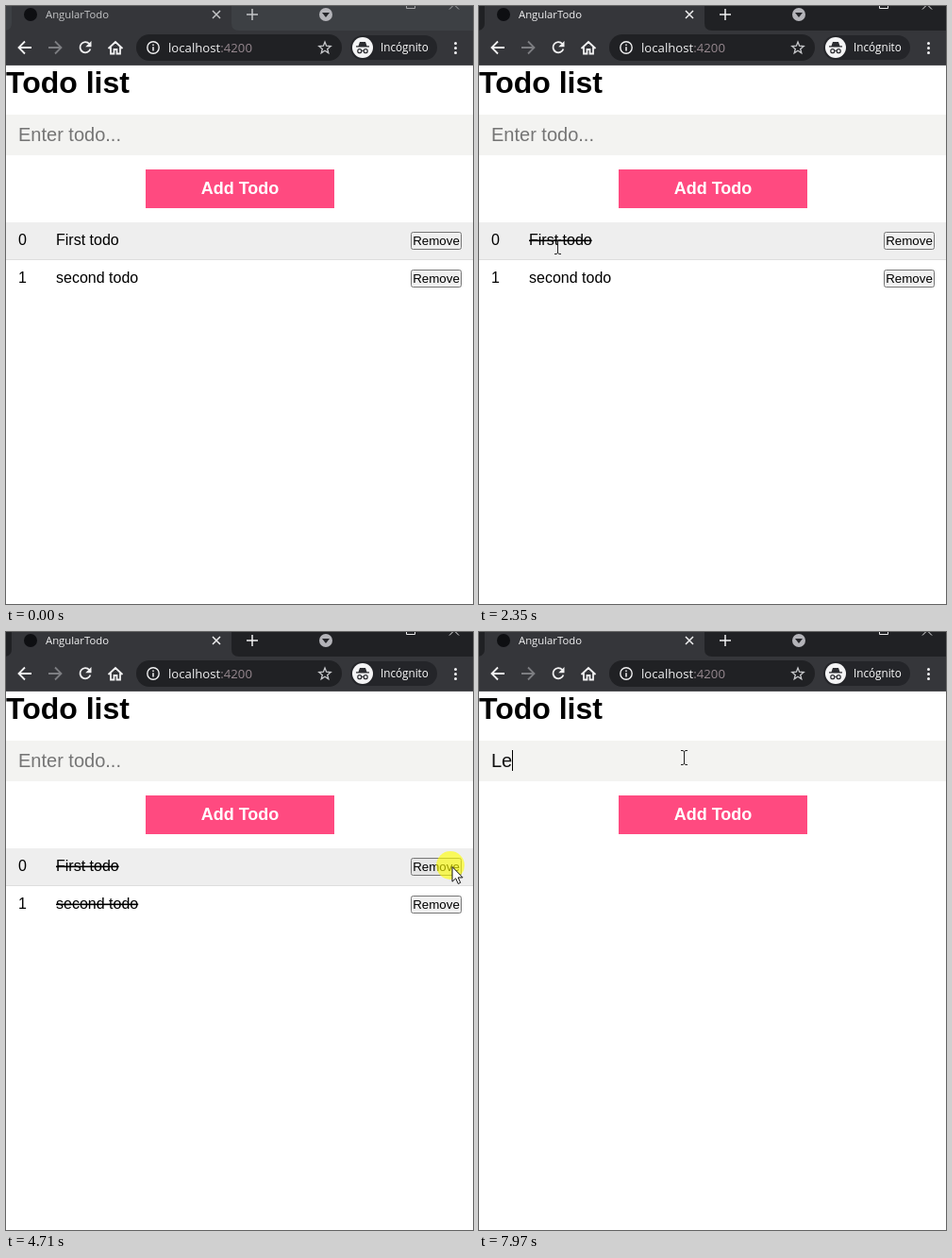
Recreate the animation shown at these times as an HTML page. Size 495x633 px, loop 8 s.

```html
<!DOCTYPE html>
<html lang="en">
<head>
<meta charset="utf-8">
<title>Todo list</title>
<style>
  html, body { margin: 0; width: 100%; height: 100%; overflow: hidden; background: #fff; }
  svg { display: block; width: 100%; height: 100%; }
  text { white-space: pre; }
  .ui { font-family: "Open Sans", "Noto Sans", sans-serif; }
  .page { font-family: "Liberation Sans", Arial, sans-serif; }
  .line { fill: none; stroke: #f1f1f2; stroke-width: 1.8; }
  .done { text-decoration: line-through; }
  #strip, #tabTitle { fill: #3d4044; }
  #tabTitle { fill: #c9cacc; }
  #stage { --ctl: #a5a6a8; --tab: #c4c5c7; --strip: #3d4044; }
  #stage.focused { --ctl: #e9e9ea; --tab: #f1f1f2; --strip: #202124; }
  #stage #strip { fill: var(--strip); }
  #stage #tabTitle { fill: var(--tab); }
  .ctl { fill: none; stroke: var(--ctl); stroke-width: 1; }
  .tabIcon { fill: none; stroke: var(--tab); stroke-width: 1.5; }
</style>
</head>
<body>
<svg id="stage" viewBox="0 0 495 633" xmlns="http://www.w3.org/2000/svg">
  <rect width="495" height="633" fill="#fff"/>

  <!-- tab strip -->
  <g class="ui">
    <rect id="strip" width="495" height="27"/>
    <path d="M-2 26Q6 26 6 18V-2H239V18Q239 26 247 26Z" fill="#35363a"/>
    <rect y="26" width="495" height="36" fill="#35363a"/>
    <rect y="62" width="495" height="1" fill="#4b4c50"/>
    <circle cx="26" cy="9" r="7" fill="#0e0f12"/>
    <text id="tabTitle" x="42" y="13" font-size="11.3">AngularTodo</text>
    <path class="tabIcon" d="M219 5l8 8M227 5l-8 8"/>
    <path class="tabIcon" d="M255 9h12M261 3v12"/>
    <circle cx="339" cy="9" r="7" fill="#b4b4b9"/>
    <path d="M335 7h8l-4 5z" fill="#25262a"/>
    <path class="ctl" d="M424.5 -6V2.5H433.5V-6M470 3.5L475 -1.5L480 3.5"/>
  </g>

  <!-- toolbar -->
  <g class="ui">
    <path class="line" d="M27 44H14M20 37.5L13.5 44L20 50.5"/>
    <path class="line" d="M45 44H58M52 37.5L58.5 44L52 50.5" style="stroke:#7d7e82"/>
    <path class="line" d="M88.3 40A5.6 5.6 0 1 0 89.4 45.5"/>
    <path d="M90.5 37v6.3h-6.3z" fill="#f1f1f2"/>
    <path class="line" d="M108.5 45L116 38L123.500 45M111 43.500V50.500H114.500V46H117.500V50.500H121V43.500" stroke-width="1.6"/>
    <rect x="138" y="30" width="218" height="28" rx="14" fill="#202124"/>
    <circle class="line" cx="156" cy="44" r="6.2" style="stroke-width:1.4"/>
    <path class="line" d="M156 43.200V47.500M156 40.500V42" style="stroke-width:1.5"/>
    <text x="172" y="49" font-size="13.2" fill="#f1f1f2">localhost<tspan fill="#96888f">:4200</tspan></text>
    <path id="star" class="line" style="stroke:#c8c9cc;stroke-width:1.3"/>
    <rect x="365" y="31" width="92" height="26" rx="13" fill="#242529"/>
    <circle cx="378" cy="44" r="11" fill="#f4f4f5"/>
    <path d="M371 43.500H385V42.300H382.500L381 38H375L373.500 42.300H371Z" fill="#2c2d31"/>
    <path d="M377 47.500Q378 46.800 379 47.500" fill="none" stroke="#2c2d31"/>
    <circle cx="374.800" cy="47.700" r="2" fill="none" stroke="#2c2d31" stroke-width="1.200"/>
    <circle cx="381.200" cy="47.700" r="2" fill="none" stroke="#2c2d31" stroke-width="1.200"/>
    <text x="397" y="48" font-size="11.700" fill="#fff">Incógnito</text>
    <g fill="#f1f1f2">
      <circle cx="476.500" cy="39.500" r="1.500"/>
      <circle cx="476.500" cy="44.500" r="1.500"/>
      <circle cx="476.500" cy="49.500" r="1.500"/>
    </g>
  </g>

  <!-- page -->
  <g class="page">
    <text x="0" y="92" font-size="32" font-weight="bold">Todo list</text>
    <rect y="115" width="495" height="43" fill="#f3f3f1"/>
    <text id="entry" x="13" y="143" font-size="20"></text>
    <rect id="caret" y="126" width="1" height="22"/>
    <rect x="148" y="173" width="200" height="41" fill="#ff4a80"/>
    <text x="248" y="199" font-size="18" font-weight="bold" text-anchor="middle" fill="#fff">Add Todo</text>
    <g id="rows" font-size="16"></g>
  </g>

  <!-- suggestions -->
  <g id="menu" class="ui" font-size="12.700" fill="#202124">
    <path d="M-4 159H190V279.500Q190 283 186.500 283H-4Z" fill="#fff" style="filter:drop-shadow(0 1px 1.500px rgba(0,0,0,.45))"/>
    <text x="10" y="190">hola que tal</text>
    <text x="10" y="226">asd</text>
    <text x="10" y="262">buenas</text>
  </g>

  <circle id="halo" r="15" fill="#ff0" opacity=".62"/>
  <path id="arrow" d="M.5 .5V16.200L4.200 12.800L6.800 18.500L9.200 17.400L6.700 11.900H11.600Z" fill="#fff" stroke="#111" stroke-width="1"/>
  <path id="beam" d="M-3 -7.500H-1L.5 -6.500L2 -7.500H4M.5 -6.500V6.500M-3 7.500H-1L.5 6.500L2 7.500H4" fill="none" stroke="#222" stroke-width="1"/>
</svg>
<script>
const LOOP = 8000;
const $ = id => document.getElementById(id);
const show = (el, on) => el.setAttribute('display', on ? 'inline' : 'none');
const put = (el, x, y) => el.setAttribute('transform', `translate(${x} ${y})`);

const todos = [
  { name: 'First todo', done: 1820, gone: 4840 },
  { name: 'second todo', done: 3240, gone: 5570 }
];

// Each move: first step, last step, step count, way points.
const moves = [
  [590, 1350, 12, [[429, 531], [310, 370], [184, 202], [112, 186], [84, 222]]],
  [1420, 1620, 4, [[84, 222], [84, 241]]],
  [2350, 2550, 4, [[84, 241], [82, 262], [72, 286]]],
  [2690, 2820, 3, [[72, 286], [104, 286]]],
  [3700, 4170, 8, [[104, 286], [200, 283], [306, 277], [420, 258], [484, 247]]],
  [4370, 4560, 4, [[484, 247], [473, 248]]],
  [5710, 5900, 4, [[473, 248], [350, 180], [217, 133]]]
];

const clicks = [[1750, 1820], [3100, 3240], [4710, 4840], [5510, 5570], [6170, 6300]];

const rows = [0, 1].map(i => {
  const y = 229 + 40 * i;
  const g = document.createElementNS('http://www.w3.org/2000/svg', 'g');
  const back = i ? '' : '<rect width="495" height="39" fill="#eee"/><rect y="39" width="495" height="1" fill="#ddd"/>';
  g.innerHTML = `${back}<text x="13" y="24">${i}</text><text class="name" x="53" y="24"></text>
    <rect class="btn" x="429.5" y="10.500" width="53" height="18" rx="2" stroke="#767676"/>
    <text x="456" y="24" font-size="13.333" text-anchor="middle">Remove</text>`;
  put(g, 0, y);
  $('rows').append(g);
  return { g, y, name: g.querySelector('.name'), btn: g.querySelector('.btn') };
});

$('star').setAttribute('d', 'M' + Array.from({ length: 10 }, (_, i) => {
  const r = i % 2 ? 2.800 : 6.500, a = Math.PI * (i / 5 - .5);
  return `${(338 + r * Math.cos(a)).toFixed(1)} ${(44.5 + r * Math.sin(a)).toFixed(1)}`;
}).join('L') + 'Z');

function along(points, p) {
  const s = p * (points.length - 1);
  const i = Math.min(Math.floor(s), points.length - 2);
  return [0, 1].map(k => Math.round(points[i][k] + (points[i + 1][k] - points[i][k]) * (s - i)));
}

function pointer(t) {
  const move = moves.filter(m => t >= m[0]).pop();
  if (!move) return null;
  const [from, to, count, points] = move;
  const step = Math.min(count - 1, Math.floor((t - from) / (to - from) * (count - 1) + .01));
  const p = move === moves[0] ? step / (count - 1) : (step + 1) / count;
  return along(points, p * (2 - p) * .4 + p * .6);
}

function render(t) {
  const pos = pointer(t);
  const [x, y] = pos || [-99, -99];
  const items = todos.filter(d => t < d.gone);
  let overText = y > 115 && y < 158;

  $('stage').classList.toggle('focused', t >= 1750);
  rows.forEach((row, i) => {
    const item = items[i];
    show(row.g, item);
    if (!item) return;
    const dy = y - row.y;
    row.name.textContent = item.name;
    row.name.classList.toggle('done', t >= item.done);
    row.btn.setAttribute('fill', x >= 429 && x < 483 && dy >= 10 && dy < 29 ? '#e5e5e5' : '#efefef');
    overText ||= x >= 53 && x <= (item === todos[0] ? 120 : 141) && dy >= 9 && dy <= 28;
  });

  const typed = t < 7500 ? '' : t < 7970 ? 'L' : 'Le';
  $('entry').textContent = typed || 'Enter todo...';
  $('entry').setAttribute('fill', typed ? '#111' : '#757575');
  $('caret').setAttribute('x', 13 + 11 * typed.length);
  $('caret').setAttribute('y', typed ? 125 : 126);
  show($('caret'), t >= 6240 && !(t >= 6780 && t < 7300));
  show($('menu'), t >= 6300 && t < 7500);

  show($('halo'), clicks.some(([a, b]) => t >= a && t < b));
  put($('halo'), x - 2, y - 1);
  show($('arrow'), pos && !overText);
  show($('beam'), pos && overText);
  put($('arrow'), x - .5, y);
  put($('beam'), x, y);
}

const start = performance.now();
function tick() {
  render((performance.now() - start) % LOOP);
  requestAnimationFrame(tick);
}
tick();
</script>
</body>
</html>
```
